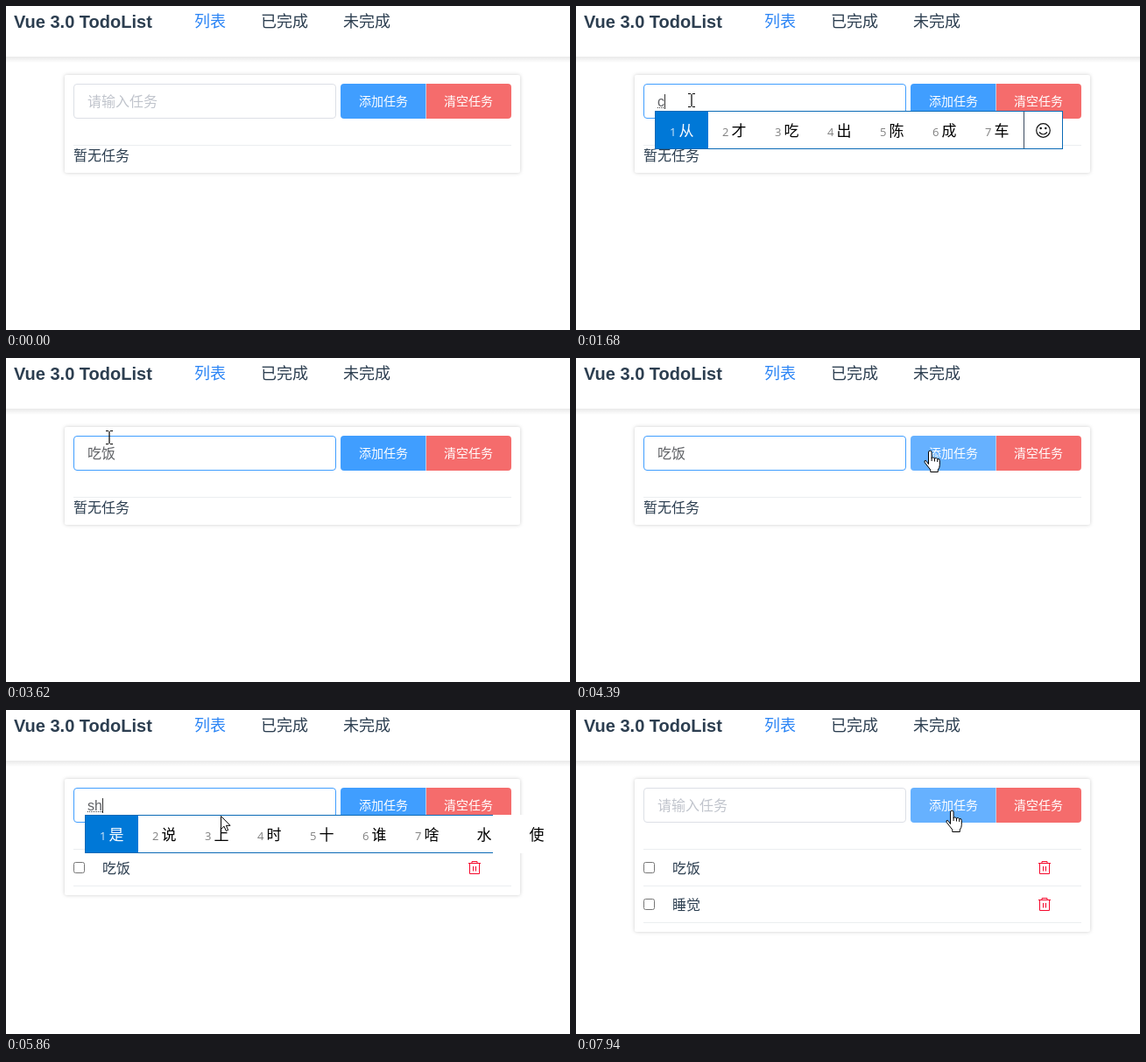
These frames come from a looping animation (644 px wide and 371 px high, 8000 ms). An HTML page:

```html
<!DOCTYPE html>
<html lang="zh-CN">
<head>
<meta charset="utf-8">
<title>TodoList</title>
<style>
  html, body { margin: 0; width: 100%; height: 100%; overflow: hidden; background: #fff; }
  svg { display: block; width: 644px; height: 371px;
    font: 16px "Liberation Sans", "Noto Sans CJK SC", "Noto Sans CJK", sans-serif; }
  .ink { fill: #2c3e50; }
  .nav { font-size: 18px; }
  .btn { font-size: 14px; fill: #fff; }
  .rule { stroke: #ebeef0; }
  .card { fill: #fff; filter: drop-shadow(0 0 2px rgba(0, 0, 0, .2)); }
  .num { font: 13px "Open Sans", "Noto Sans", sans-serif; fill: #808080; }
  .cand { font-size: 17px; }
  .line { fill: none; stroke: #0a6ab6; }
  .face { fill: none; stroke: #111; stroke-width: 1.2; }
</style>
</head>
<body>
<svg viewBox="0 0 644 371">
  <defs>
    <linearGradient id="fade" x2="0" y2="1">
      <stop stop-color="#e9e9e9"/><stop offset="1" stop-color="#fff"/>
    </linearGradient>
    <g id="row">
      <rect x="77.5" y="174.5" width="12" height="12" rx="2" fill="#fff" stroke="#767676"/>
      <path d="M528 175.5h14M532 175v-1.5h6v1.5M529.5 176v11.5h11v-11.5M533.5 179v5.5M536.5 179v5.5" fill="none" stroke="#f5082c"/>
      <path d="M77 201.5h500" class="rule"/>
    </g>
  </defs>

  <rect y="58" width="644" height="7" fill="url(#fade)"/>
  <text x="9" y="25" class="ink" font-size="20" font-weight="bold">Vue 3.0 TodoList</text>
  <g class="nav ink">
    <text x="215" y="24" fill="#2a84f5">列表</text>
    <text x="291" y="24">已完成</text>
    <text x="385" y="24">未完成</text>
  </g>

  <rect id="card" class="card" x="67" y="79" width="520" rx="2"/>
  <rect id="box" x="77.5" y="89.5" width="299" height="39" rx="3.5" fill="#fff"/>
  <text id="value" x="93" y="114.5"></text>
  <path id="under" stroke="#444" stroke-dasharray="1 1"/>
  <path id="caret" stroke="#333"/>

  <path id="add" d="M479 89h-93a4 4 0 0 0-4 4v32a4 4 0 0 0 4 4h93z"/>
  <path d="M480 89h93a4 4 0 0 1 4 4v32a4 4 0 0 1-4 4h-93z" fill="#f56c6c"/>
  <path d="M479.5 89v40" stroke="#b9cdf0"/>
  <g class="btn">
    <text x="403" y="114">添加任务</text>
    <text x="500" y="114">清空任务</text>
  </g>

  <path d="M77 159.5h500" class="rule"/>
  <text id="empty" x="77" y="177" class="ink">暂无任务</text>
  <g id="row1" class="ink"><use href="#row"/><text x="110" y="187">吃饭</text></g>
  <g id="row2" class="ink" transform="translate(0 42)"><use href="#row"/><text x="110" y="187">睡觉</text></g>

  <g id="popup"></g>

  <g id="arrow" fill="#fff" stroke="#000">
    <path d="M.5.5v15l3.5-3.3 2.4 5.3 2.3-1-2.3-5.2h4.6z"/>
  </g>
  <path id="beam" d="M-4-7.5h3M1-7.5h3M0-7v14M-4 7.5h3M1 7.5h3" stroke="#000" stroke-width="1.2"/>
  <g id="hand" fill="#fff" stroke="#000" stroke-linejoin="round">
    <path d="M-1.5 15.5V2a1.7 1.7 0 0 1 3.6 0v6.5q1.7-1.6 3.4.4 1.8-1.2 3.2.7 2.6-.8 2.6 2v5q0 3-2 5.5v2.4H.8v-2.4L-5.8 13.600q-1-2.500 1.300-2.200z"/>
    <path d="M2.100 8v4M5.500 9v3.500M8.700 10v3" fill="none"/>
  </g>
</svg>

<script>
const LOOP = 8000;
const $ = id => document.getElementById(id);
const show = (id, on) => $(id).setAttribute('visibility', on ? 'visible' : 'hidden');
const put = (id, attrs) => {
  for (const k in attrs) $(id).setAttribute(k, attrs[k]);
};

// time, x, y of the pointer
const path = [
  [110, 256, 322], [300, 225, 258], [520, 172, 165], [810, 132, 108],
  [3619, 132, 108], [3620, 118, 91], [3700, 119, 91], [3850, 119, 91],
  [4060, 205, 99], [4270, 350, 105], [4450, 430, 107], [4650, 430, 107],
  [4800, 340, 114], [4920, 252, 121], [4990, 245, 121],
  [7109, 245, 121], [7110, 268, 116], [7180, 291, 103], [7400, 291, 103],
  [7560, 355, 107], [7740, 429, 115], [8000, 429, 115]
];

// time, text, candidates, popup layout
const NORMAL = 0, SPILL = 1, WIDE = 2;
const typing = [
  [1680, 'c', '从 才 吃 出 陈 成 车', NORMAL],
  [1760, 'ch', '吃 出 陈 成 车 场 城 处 传', SPILL],
  [1840, 'chi', '吃 持 尺 迟 池 齿 翅 赤 痴', SPILL],
  [1910, 'chi', '吃 持 尺 迟 池 齿 翅 赤 痴', WIDE],
  [2290, "chi'fan", '吃饭 吃翻 吃反 迟返 持番 池饭 赤帆', WIDE],
  [2690, '吃饭'], [4550, ''],
  [5540, 's', '是 上 说 三 四 所 随', NORMAL],
  [5860, 'sh', '是 说 上 时 十 谁 啥 水 使', SPILL],
  [5940, 'shu', '书 数 输 属 树 熟 叔 鼠 束', SPILL],
  [6030, 'shui', '水 谁 睡 税 说 誰 氵 帅 悦', WIDE],
  [6180, "shui'j", '睡觉 水晶 税金 水井 水饺 水交 水警', WIDE],
  [6400, "shui'jiao", '睡觉 水饺 水浇 睡教 水角 谁叫 税交', WIDE],
  [6650, '睡觉'], [7850, '']
];

const carets = [[930, 1440], [1680, 3230], [3850, 4290], [4890, 5390], [5540, 7180], [7710, 7800]];
const within = (t, spans) => spans.some(([a, b]) => t >= a && t < b);
const ramp = (t, a, b) => Math.min(1, Math.max(0, (t - a) / (b - a)));
const mix = (a, b, k) => `rgb(${a.map((v, i) => Math.round(v + (b[i] - v) * k))})`;

function pointer(t) {
  const i = path.findIndex(p => p[0] > t);
  if (i < 1) return null;
  const [t0, x0, y0] = path[i - 1], [t1, x1, y1] = path[i];
  const k = (t - t0) / (t1 - t0);
  return { x: Math.round(x0 + (x1 - x0) * k), y: Math.round(y0 + (y1 - y0) * k) };
}

function popup(list, layout) {
  const words = list.split(' ');
  const step = 43 + 17 * words[0].length;
  const edge = layout === NORMAL ? 556 : 644;
  let s = `<path d="M90 120H${edge}V164H90z" fill="#fff"/>` +
    `<path d="M90 120h${step + 1}v44h-${step + 1}z" fill="#0078d7"/>`;
  words.forEach((word, i) => {
    const x = 107 + step * i;
    if (i < 7) s += `<text class="num" x="${x}" y="149"${i ? '' : ' style="fill:#d5e8f8"'}>${i + 1}</text>`;
    s += `<text class="cand" x="${x + 10.5}" y="149" fill="${i ? '#000' : '#fff'}">${word}</text>`;
  });
  const right = layout === WIDE ? 645 : 556;
  s += `<path class="line" d="M${right} 120.5H90.5V163.5H${right}"/>`;
  if (layout === NORMAL) {
    s += '<path class="line" d="M555.5 120v44"/><path d="M511.5 121v42" stroke="#3b4b60"/>' +
      '<circle class="face" cx="533.5" cy="142.500" r="7.800"/>' +
      '<path class="face" d="M529 144.500q4.500 5 9 0"/>' +
      '<circle cx="530.700" cy="140" r="1.200"/><circle cx="536.300" cy="140" r="1.200"/>';
  } else if (step > 60) {
    s += '<path d="M636.5 121v42" stroke="#3b4b60"/>';
  }
  return s;
}

let shown = null;

function draw(t) {
  const state = typing.filter(s => s[0] <= t).pop() || [0, ''];
  const [, text, list, layout] = state;
  if (state[0] !== shown) {
    shown = state[0];
    $('value').textContent = text || '请输入任务';
    put('value', { fill: text ? '#606266' : '#c0c4cc' });
    $('popup').innerHTML = list ? popup(list, layout) : '';
  }
  const end = 93 + (text ? Math.round($('value').getComputedTextLength()) : 0);
  put('under', { d: `M93 116.5H${end}` });
  show('under', list);
  put('caret', { d: `M${end + .5} 101v17` });
  show('caret', within(t, carets));

  const rows = (t >= 4550) + (t >= 7850);
  put('card', { height: rows ? 91 + 42 * rows : 112 });
  show('empty', !rows);
  show('row1', rows > 0);
  show('row2', rows > 1);

  const p = pointer(t);
  const inside = (a, b) => p && p.x >= a && p.x < b && p.y >= 89 && p.y < 129;
  const overAdd = inside(382, 480);
  const overInput = inside(77, 377) && !(list && p.y >= 120);
  const kind = !p ? '' : overAdd ? 'hand' : overInput ? 'beam' : 'arrow';
  for (const id of ['arrow', 'beam', 'hand']) show(id, id === kind);
  if (p) put(kind, { transform: `translate(${p.x} ${p.y})` });

  const focus = ramp(t, 930, 1040) - ramp(t, 4480, 4600) + ramp(t, 4880, 4985) - ramp(t, 7800, 7930);
  const idle = overInput ? [192, 196, 204] : [220, 223, 230];
  put('box', { stroke: mix(idle, [64, 158, 255], focus) });
  put('add', { fill: overAdd ? '#66b1ff' : '#409eff' });
}

const start = performance.now();
function tick() {
  draw((performance.now() - start) % LOOP);
  requestAnimationFrame(tick);
}
tick();
</script>
</body>
</html>
```
